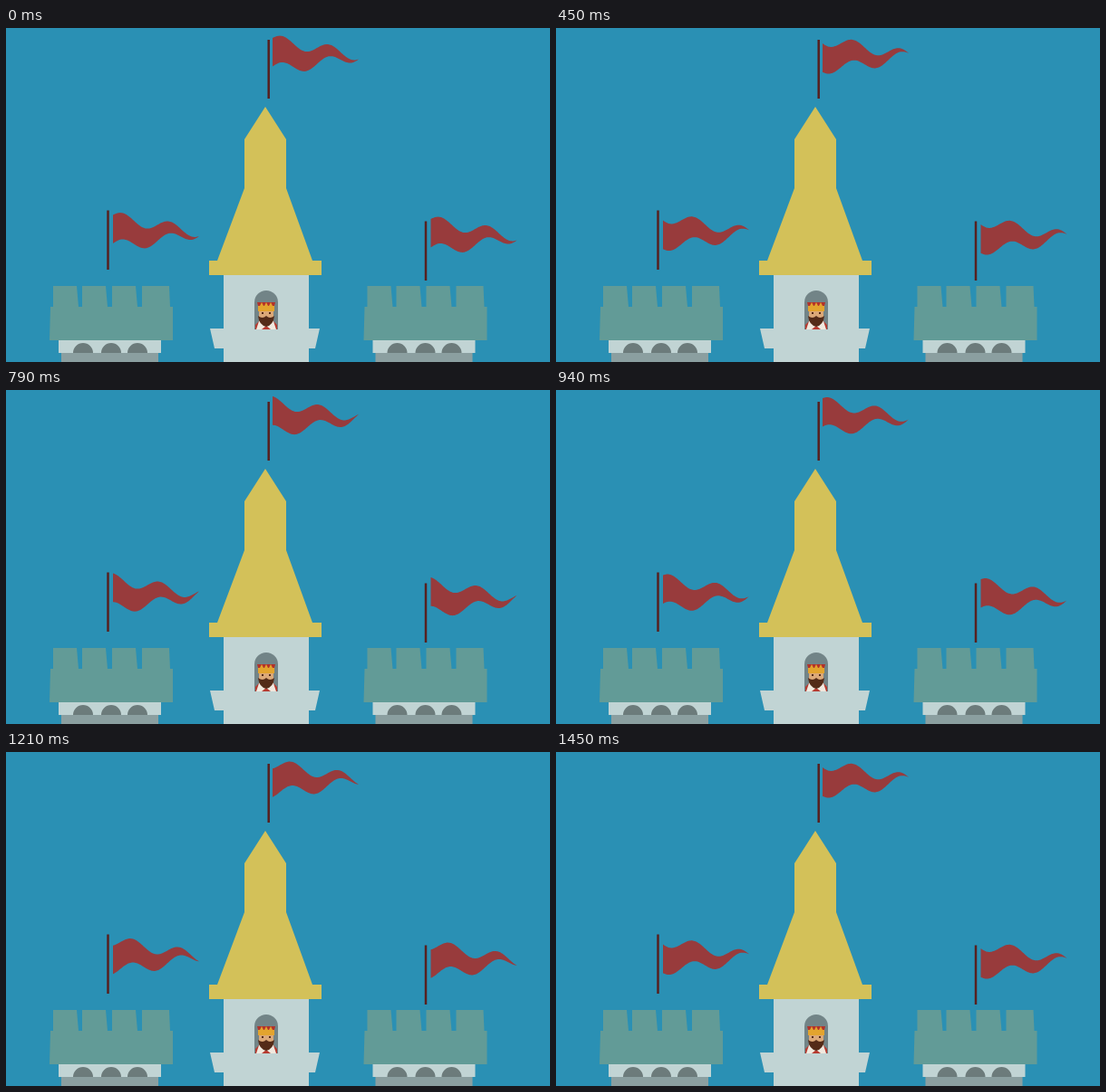
An HTML page that plays this animation: 600 by 369 pixels, repeating every 1520 ms.

```html
<!DOCTYPE html>
<html lang="en">
<head>
<meta charset="utf-8">
<title>Castle flags</title>
<style>
  html, body { margin: 0; width: 100%; height: 100%; overflow: hidden; background: #2a90b4; }
  svg { display: block; width: 100vw; height: 100vh; }
</style>
</head>
<body>
<svg viewBox="0 0 600 369">
  <defs>
    <path id="flag" fill="#983b3c"/>
    <g id="turret">
      <path fill="#629b97" d="M48 345L49 308H52V285H78L80 308H84V285H110L112 308H117V285H143L145 308H150V285H180L181 308H184V345Z"/>
      <path fill="#c1d4d4" d="M58 345H171V359H58Z"/>
      <path fill="#8b9fa0" d="M61 359H168V369H61Z"/>
      <path fill="#6c7b7b" d="M74 359a11 11 0 0 1 22 0ZM105 359a11 11 0 0 1 22 0ZM134 359a11 11 0 0 1 22 0Z"/>
    </g>
  </defs>
  <rect width="600" height="369" fill="#2a90b4"/>

  <use href="#turret"/>
  <use href="#turret" x="346.5"/>

  <path fill="#c1d4d4" d="M240 272H334V332H346L341 354H334V369H240V354H230L225 332H240Z"/>
  <path fill="#d3c159" d="M286 87L309 123V177L338 257H348V273H224V257H233L263 177V123Z"/>

  <path fill="#728487" d="M274 333V303a13 13 0 0 1 26 0V333Z"/>
  <g id="king">
    <path fill="#b63a30" d="M275 333V328L279 324H295L299 328V333Z"/>
    <path fill="#f0e9df" d="M276 333L279 324H295L298 333H292L287 329L282 333Z"/>
    <path fill="#dba878" d="M279 311H295V324H279Z"/>
    <path fill="#542b18" d="M278 318Q283 322 287 318Q291 322 296 318Q295 328 287 330Q279 328 278 318Z"/>
    <path fill="#e3a42e" d="M278 304H296V313H278Z"/>
    <path fill="#b3322a" d="M277 303H297L296 307H278Z"/>
    <path fill="#e3a42e" d="M280 307L282 303L284 307ZM285 307L287 303L289 307ZM290 307L292 303L294 307Z"/>
    <path fill="#542b18" d="M282 314h2v2h-2ZM290 314h2v2h-2Z"/>
  </g>

  <path stroke="#57201f" stroke-width="2.5" d="M112.5 201.5V267M289.7 13V78M463 213.5V279"/>
  <use href="#flag" x="118" y="195.5"/>
  <use href="#flag" x="294" y="0"/>
  <use href="#flag" x="468.5" y="200"/>
</svg>
<script>
const LOOP = 1520, PERIOD = 1000, WAVELENGTH = 52, LENGTH = 95;
const holds = { 60: 90, 450: 100, 790: 90, 1120: 90, 1450: 70 };
const flag = document.getElementById("flag");

// Poses last 60 ms except for a few longer holds.
function poseTime(time) {
  let start = 0;
  for (;;) {
    const end = start + (holds[start] || 60);
    if (time < end || end >= LOOP) return start;
    start = end;
  }
}

function flagPath(time) {
  const crest = 10 + WAVELENGTH * time / PERIOD;
  const wave = x => -6.2 * Math.cos(2 * Math.PI * (x - crest) / WAVELENGTH);
  const top = x => 13.2 + 0.18 * x + wave(x);
  const bottom = x => 44.8 - 0.05 * x - 0.00108 * x * x + wave(x);
  const points = [];
  for (let x = 0; x <= LENGTH; x++) {
    points.push(`${x} ${top(x).toFixed(2)}`);
  }
  for (let x = LENGTH; x >= 0; x--) {
    points.push(`${x} ${bottom(x).toFixed(2)}`);
  }
  return `M${points.join("L")}Z`;
}

function draw() {
  flag.setAttribute("d", flagPath(poseTime(performance.now() % LOOP)));
  requestAnimationFrame(draw);
}
draw();
</script>
</body>
</html>
```
